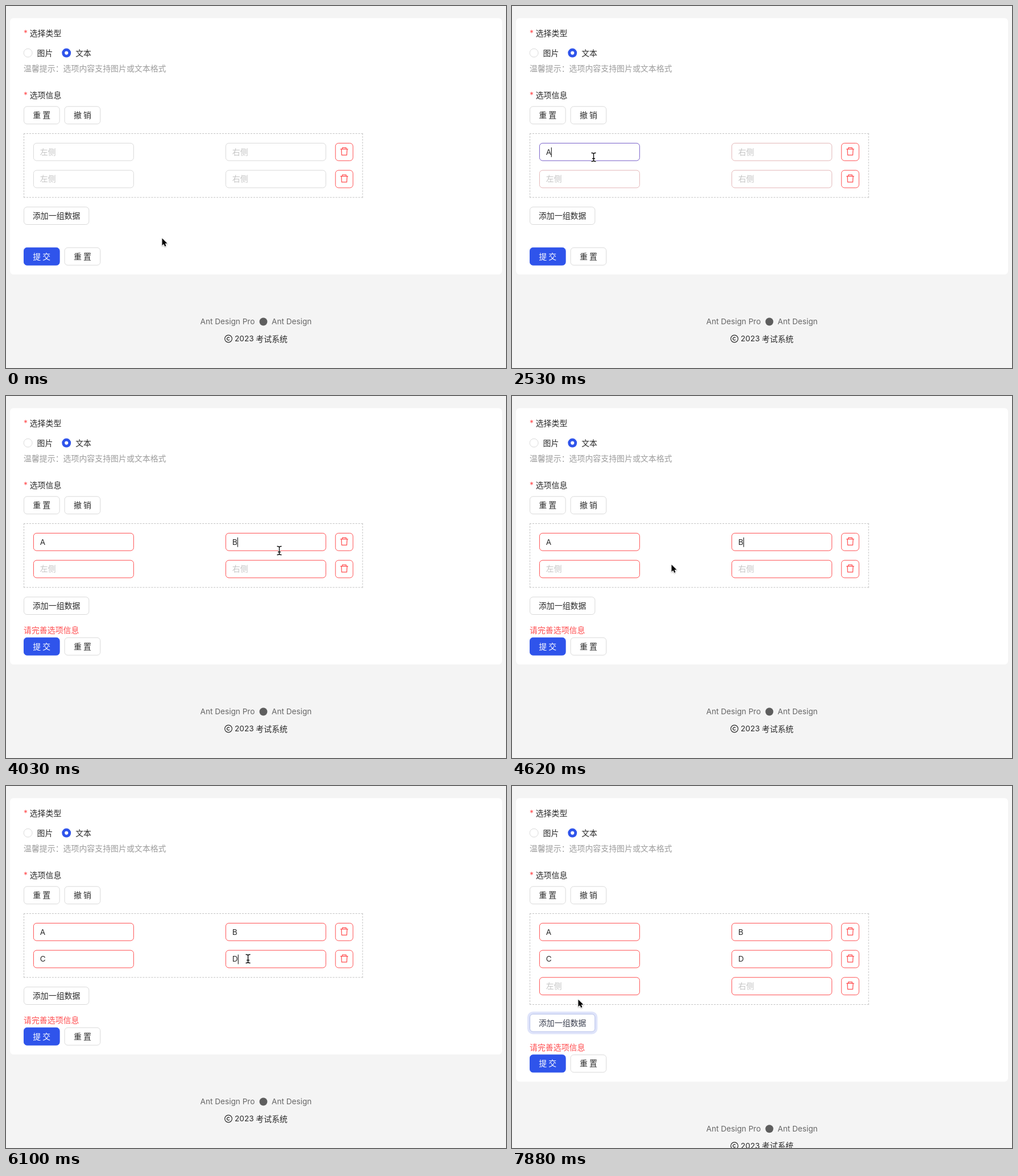
An HTML page with a canvas that plays this animation: 879 px wide and 637 px high, repeating every 8000 ms.

```html
<!DOCTYPE html>
<html lang="zh-CN">
<head>
<meta charset="utf-8">
<title>选项信息</title>
<style>
html, body { margin: 0; width: 100%; height: 100%; overflow: hidden; background: #f4f4f4; }
canvas { display: block; }
</style>
</head>
<body>
<canvas id="stage" width="879" height="637"></canvas>
<script>
const ctx = document.getElementById('stage').getContext('2d');
const LOOP = 8000;
const ZOOM = 0.994; // the page is shown slightly reduced
const CJK = '14px "Noto Sans CJK SC", "Noto Sans CJK", sans-serif';
const LATIN = '13.7px Inter, "Noto Sans", sans-serif';
const INK = '#2a2a2a', BLUE = '#2f54eb', HOVER = '#597ef7';
const RED = [255, 77, 79], GREY = [217, 217, 217], FOCUS = [72, 100, 240];
const TIP_FILL = '请完善选项信息', TIP_ANSWER = '请设置标准答案';
const LEFT = 31, ROW_Y = 241, PITCH = 48, FIELD_W = 178, FIELD_X = [48, 388];

// Pointer: start time, shape, hot spot
const POINTER = [
  [0, 'arrow', 274, 408], [450, 'arrow', 258, 372], [600, 'arrow', 192, 308],
  [750, 'beam', 143, 266], [1940, 'none', 143, 266], [2390, 'beam', 143, 266],
  [2680, 'beam', 150, 265], [2830, 'beam', 190, 263], [2980, 'arrow', 262, 260],
  [3130, 'arrow', 350, 262], [3280, 'beam', 430, 268], [3430, 'beam', 476, 275],
  [3580, 'beam', 480, 272], [3730, 'none', 480, 272], [4030, 'beam', 480, 272],
  [4180, 'beam', 462, 277], [4330, 'arrow', 372, 288], [4480, 'arrow', 280, 296],
  [4630, 'beam', 200, 303], [4780, 'beam', 150, 306], [5060, 'none', 150, 306],
  [5360, 'arrow', 345, 318], [5510, 'arrow', 378, 311], [5650, 'beam', 408, 306],
  [5800, 'beam', 425, 304], [6240, 'none', 425, 304], [6540, 'beam', 396, 312],
  [6690, 'arrow', 300, 338], [6840, 'arrow', 190, 368], [6980, 'hand', 124, 374],
  [7130, 'hand', 117, 377], [7730, 'arrow', 116, 376], [7880, 'arrow', 116, 375]
];
// Caret: start time, field index (-1 for none)
const CARET = [[0, -1], [900, 0], [1500, -1], [1800, 0], [3580, 1], [4930, 2], [5800, 3], [6690, -1]];
const FOCUSED = [[0, -1], [900, 0], [3580, 1], [4930, 2], [5800, 3], [7730, -1]];
const TYPED = [['A', 1940], ['B', 3730], ['C', 5060], ['D', 6100]];
const ERROR = [[0, 0], [2530, 0.25], [2680, 0.85], [2830, 1]];

const at = (keys, t) => keys.filter(k => k[0] <= t).pop();
const rgb = c => `rgb(${c.map(Math.round)})`;
const mix = (a, b, k) => a.map((v, i) => v + (b[i] - v) * k);

function text(s, x, y, color = INK, font = CJK, align = 'left') {
  ctx.font = font;
  ctx.textAlign = align;
  ctx.fillStyle = color;
  ctx.fillText(s, x, y);
}

function fillBox(x, y, w, h, r, color) {
  ctx.beginPath();
  ctx.roundRect(x, y, w, h, r);
  ctx.fillStyle = color;
  ctx.fill();
}

function box(x, y, w, h, line, fill = '#fff') {
  ctx.beginPath();
  ctx.roundRect(x + 0.5, y + 0.5, w - 1, h - 1, 5.5);
  ctx.fillStyle = fill;
  ctx.fill();
  ctx.strokeStyle = line;
  ctx.lineWidth = 1;
  ctx.stroke();
}

function button(label, x, y, w, line = rgb(GREY), color = INK, fill = '#fff') {
  box(x, y, w, 32, line, fill);
  text(label, x + w / 2, y + 21, color, CJK, 'center');
}

function disc(x, y, r, color) {
  ctx.beginPath();
  ctx.arc(x, y, r, 0, 7);
  ctx.fillStyle = color;
  ctx.fill();
}

function ring(x, y, r, color, width, from = 0, to = Math.PI * 2) {
  ctx.beginPath();
  ctx.arc(x, y, r, from, to);
  ctx.strokeStyle = color;
  ctx.lineWidth = width;
  ctx.stroke();
}

// A dashed edge that begins and ends with a whole dash
function dashed(x1, y1, x2, y2) {
  const length = x2 - x1 + y2 - y1;
  const count = Math.floor((length + 2) / 5);
  ctx.setLineDash([3, (length - 3 * count) / (count - 1)]);
  ctx.beginPath();
  ctx.moveTo(x1, y1);
  ctx.lineTo(x2, y2);
  ctx.strokeStyle = '#c2c2c2';
  ctx.lineWidth = 1;
  ctx.stroke();
  ctx.setLineDash([]);
}

function dashedBox(x, y, w, h) {
  const r = x + w, b = y + h;
  dashed(x, y + 0.5, r, y + 0.5);
  dashed(x, b - 0.5, r, b - 0.5);
  dashed(x + 0.5, y, x + 0.5, b);
  dashed(r - 0.5, y, r - 0.5, b);
}

function trash(x, y) {
  box(x, y, 32, 32, rgb(RED));
  ctx.save();
  ctx.translate(x + 8, y + 7);
  ctx.beginPath();
  ctx.moveTo(1.2, 4.1); ctx.lineTo(14.8, 4.1);
  ctx.moveTo(4.6, 4); ctx.lineTo(4.6, 1.6); ctx.lineTo(11.4, 1.6); ctx.lineTo(11.4, 4);
  ctx.moveTo(2.9, 4.1); ctx.lineTo(3.5, 14.5); ctx.lineTo(12.5, 14.5); ctx.lineTo(13.1, 4.1);
  ctx.strokeStyle = rgb(RED);
  ctx.lineWidth = 1.25;
  ctx.lineJoin = 'round';
  ctx.stroke();
  ctx.restore();
}

const shapes = {
  none() {},
  arrow() {
    const p = new Path2D('M0 0V14.2L3.3 11.2L5.4 16L7.8 15L5.8 10.3H10.2Z');
    ctx.translate(0.5, 0.8);
    ctx.scale(0.88, 0.88);
    ctx.lineJoin = 'round';
    ctx.strokeStyle = '#fff';
    ctx.lineWidth = 2;
    ctx.shadowColor = 'rgba(0,0,0,.3)';
    ctx.shadowBlur = 2;
    ctx.shadowOffsetY = 1;
    ctx.stroke(p);
    ctx.shadowColor = 'transparent';
    ctx.fillStyle = '#000';
    ctx.fill(p);
  },
  beam() {
    const p = new Path2D('M-3.5 -7.5Q0 -7.5 0 -5.5Q0 -7.5 3.5 -7.5M0 -5.5V5.5M-3.5 7.5Q0 7.5 0 5.5Q0 7.5 3.5 7.5M-2 2.5H2');
    ctx.translate(0.5, 0);
    ctx.lineCap = 'round';
    for (const [color, width] of [['#fff', 3], ['#000', 1.3]]) {
      ctx.strokeStyle = color;
      ctx.lineWidth = width;
      ctx.stroke(p);
    }
  },
  hand() {
    const p = new Path2D('M-1.5 10V1Q-1.5 -.8 0 -.8T1.5 1V6Q1.6 4.7 2.8 4.8T4.2 6.2Q4.4 5.2 5.5 5.4T6.7 7Q7 6.2 8 6.5T9 8.2V11Q9 13 7.7 14.5V16.5H.2V15Q-1.5 13.7 -3 11.3L-5.4 8.4Q-6 7.2 -5 6.8T-3 7.6Z');
    ctx.lineJoin = 'round';
    ctx.strokeStyle = '#fff';
    ctx.lineWidth = 3;
    ctx.stroke(p);
    ctx.fillStyle = '#fff';
    ctx.fill(p);
    ctx.strokeStyle = '#000';
    ctx.lineWidth = 1.2;
    ctx.stroke(p);
    ctx.lineWidth = 1;
    ctx.stroke(new Path2D('M1.5 6V8.5M4.2 6.5V8.7M6.7 7V9M1.6 11V14M4 11V14M6.2 11V14'));
  }
};

function heading(label, y) {
  text('*', LEFT, y, rgb(RED), '14px Inter, sans-serif');
  text(label, 41.7, y);
}

function field(i, t, mouse) {
  const x = FIELD_X[i % 2], y = ROW_Y + PITCH * (i >> 1);
  const focused = at(FOCUSED, t)[1] === i;
  const [, shape, mx, my] = mouse;
  const hover = shape === 'beam' && mx >= x && mx < x + FIELD_W && my >= y && my < y + 32;
  const err = at(ERROR, t)[1];
  const rest = focused || (hover && err === 0) ? FOCUS : GREY;
  const goal = hover && !focused && err === 1 ? [255, 163, 158] : RED;
  box(x, y, FIELD_W, 32, rgb(mix(rest, goal, err)));

  const [value, since] = TYPED[i] || ['', Infinity];
  const shown = t >= since;
  if (shown) text(value, x + 12, y + 21, INK, LATIN);
  else text(i % 2 ? '右侧' : '左侧', x + 12, y + 21, '#c4c4c4');
  if (at(CARET, t)[1] === i) {
    const w = shown ? Math.round(ctx.measureText(value).width) : 0;
    ctx.fillStyle = '#000';
    ctx.fillRect(x + 12 + w, y + 8, 1, 17);
  }
}

function handles() {
  ctx.fillStyle = '#c9c9c9';
  for (const y of [ROW_Y, ROW_Y + PITCH])
    for (const x of [FIELD_X[0] + FIELD_W, FIELD_X[1] - 12]) ctx.fillRect(x, y + 10, 12, 12);
}

function addButton(t, y, shape) {
  if (t >= 7880) {
    fillBox(LEFT - 4, y - 4, 124, 40, 10, '#dfe4fa');
    button('添加一组数据', LEFT, y, 116, '#b4bfe9', '#3c4050');
  } else if (shape === 'hand' || t >= 7730) {
    button('添加一组数据', LEFT, y, 116, HOVER, HOVER);
  } else {
    button('添加一组数据', LEFT, y, 116);
  }
}

function footer(dy) {
  const y1 = 557.5 + dy, y2 = 587.7 + dy;
  text('Ant Design Pro', 343.4, y1 + 5, '#666', LATIN);
  disc(455, y1, 7, '#5e5e5e');
  text('Ant Design', 469.7, y1 + 5, '#666', LATIN);
  ring(393.2, y2, 6.4, INK, 1.2);
  ring(393.2, y2, 2.5, INK, 1.2, 0.75, Math.PI * 2 - 0.75);
  text('2023', 404.3, y2 + 5, INK, LATIN);
  text('考试系统', 441.8, y2 + 5.3);
}

function drawPage(t, mouse) {
  const rows = t >= 7730 ? 3 : 2;
  const dy = (rows - 2) * PITCH;
  const answering = t >= 6390 && t < 7730;
  fillBox(7, 20, 870, 454 + dy, 6, '#fff');

  heading('选择类型', 52);
  ring(38.7, 81.7, 7.5, '#d9d9d9', 1);
  text('图片', 54.7, 87);
  disc(106.7, 81.7, 8, BLUE);
  disc(106.7, 81.7, 3.1, '#fff');
  text('文本', 122.7, 87);
  text('温馨提示：选项内容支持图片或文本格式', LEFT, 114.2, '#9c9c9c');

  heading('选项信息', 161.7);
  button('重 置', LEFT, 176, 64);
  button('撤 销', LEFT + 72, 176, 64);

  dashedBox(LEFT, 224, 600, 114 + dy);
  if (answering) handles();
  for (let r = 0; r < rows; r++) {
    field(r * 2, t, mouse);
    field(r * 2 + 1, t, mouse);
    trash(582, ROW_Y + PITCH * r);
  }

  addButton(t, 354 + dy, mouse[1]);
  if (t >= 2680) {
    ctx.globalAlpha = t < 2830 ? 0.7 : 1;
    text(answering ? TIP_ANSWER : TIP_FILL, LEFT, 418 + dy, rgb(RED));
    ctx.globalAlpha = 1;
  }
  button('提 交', LEFT, 426 + dy, 64, BLUE, '#fff', BLUE);
  button('重 置', LEFT + 72, 426 + dy, 64);
  footer(dy);
}

function draw(t) {
  const mouse = at(POINTER, t);
  ctx.fillStyle = '#f4f4f4';
  ctx.fillRect(0, 0, 879, 637);

  ctx.save();
  ctx.translate(LEFT * (1 - ZOOM), 224 * (1 - ZOOM));
  ctx.scale(ZOOM, ZOOM);
  drawPage(t, mouse);
  ctx.restore();

  ctx.save();
  ctx.translate(mouse[2], mouse[3]);
  shapes[mouse[1]]();
  ctx.restore();
}

const start = performance.now();
function tick() {
  draw((performance.now() - start) % LOOP);
  requestAnimationFrame(tick);
}
tick();
</script>
</body>
</html>
```
